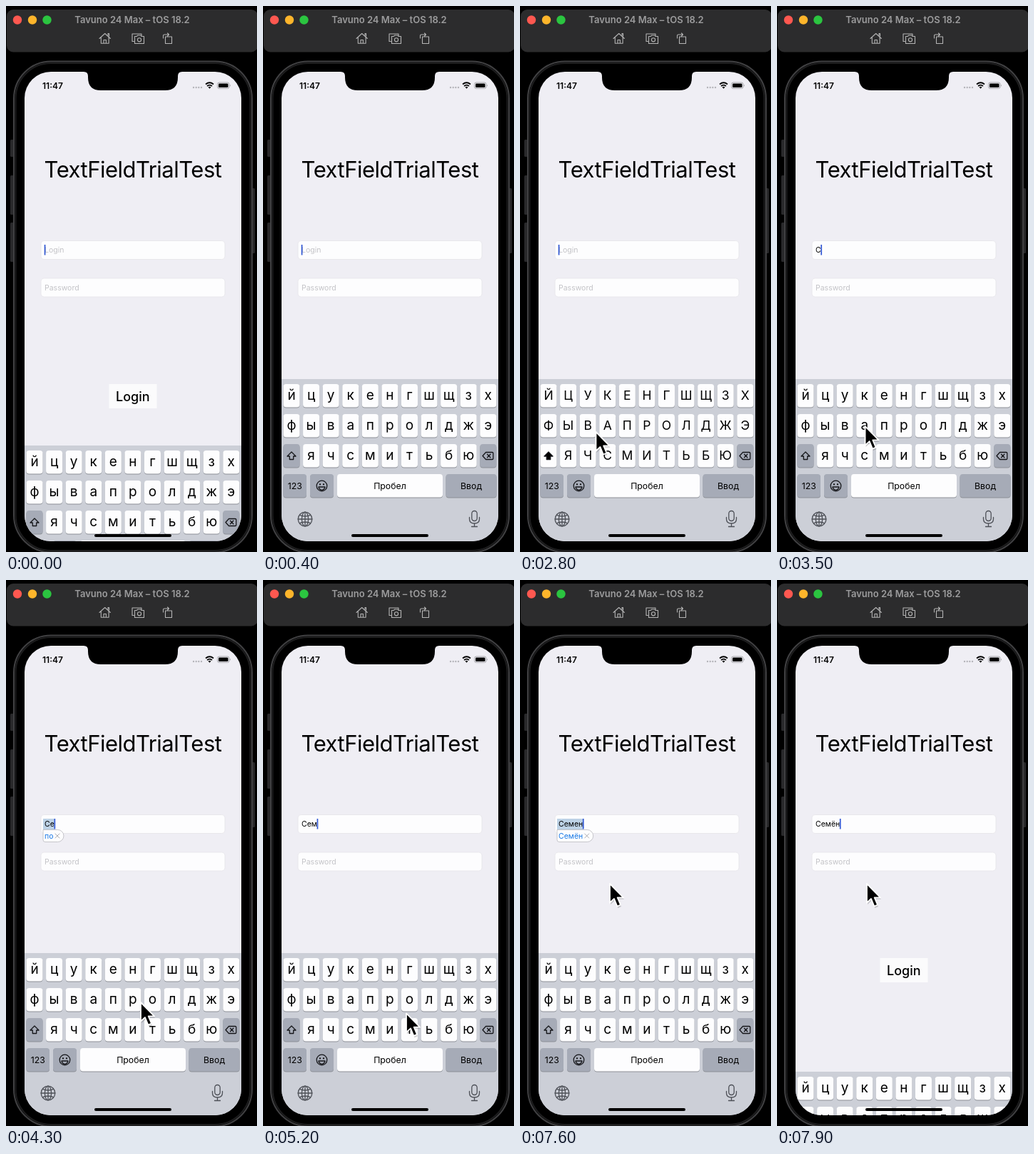
Write an HTML page that moves like this. It is 352 px wide and 764 px high and loops after 8000 ms.

```html
<!DOCTYPE html>
<html lang="en">
<head>
<meta charset="utf-8">
<title>Login form</title>
<style>
  html, body { margin: 0; width: 100%; height: 100%; overflow: hidden; background: #000; }
  svg { display: block; width: 100vw; height: 100vh; }
  text { font-family: Inter, "Open Sans", sans-serif; }
  .mid { text-anchor: middle; }
  .line { fill: none; stroke: #b4b4b4; stroke-width: 1.1; stroke-linecap: round; stroke-linejoin: round; }
  .glyph { fill: none; stroke: #15161a; stroke-width: 1.3; stroke-linecap: round; stroke-linejoin: round; }
  .soft { fill: none; stroke: #4d5057; stroke-width: 1.3; stroke-linecap: round; }
  .field { fill: #fdfdfe; stroke: #e5e4e9; stroke-width: .8; }
  .small { font-size: 10.5px; }
  .hint { fill: #c3c3c7; }
</style>
</head>
<body>
<svg viewBox="0 0 352 764">
  <defs>
    <clipPath id="screen"><rect x="26" y="92" width="304" height="657" rx="37"/></clipPath>
  </defs>
  <rect width="352" height="764" fill="#000"/>

  <!-- window bar -->
  <rect x="1" y="5" width="352" height="59.5" rx="9" fill="#2c2c2d"/>
  <circle cx="16" cy="19.5" r="6.2" fill="#fe5850"/>
  <circle cx="37" cy="19.5" r="6.2" fill="#fdb52b"/>
  <circle cx="57.5" cy="19.5" r="6.2" fill="#2bc540"/>
  <text class="mid" x="177" y="24" font-size="13" font-weight="600" fill="#9c9c9d">Tavuno 24 Max – tOS 18.2</text>
  <g class="line">
    <path d="M131 45.5l7.7-7 7.7 7M133.3 44v8.3h10.8V44M137 52v-4.500h3.400V52M143 41v-2.500h1.500v3.800"/>
    <path d="M179.500 49.500h-2.500v-10.500h13v2.500"/>
    <path d="M180.500 42.500h3l1-1.500h4.500l1 1.500h3.500v10h-13z"/>
    <circle cx="187" cy="47.300" r="2.600"/>
    <path d="M223.500 43h9v9.500h-9zM220.500 45v-3.500q0-1.500 1.500-1.500h6.500M226.500 38l2 2-2 2"/>
  </g>

  <!-- handset -->
  <g fill="#29292b">
    <rect x="6" y="187" width="5" height="24" rx="1.500"/>
    <rect x="6" y="237" width="5" height="55" rx="1.500"/>
    <rect x="6" y="303" width="5" height="55" rx="1.500"/>
    <rect x="344" y="255" width="5" height="91" rx="1.500"/>
  </g>
  <rect x="11" y="77.500" width="334" height="687" rx="52" fill="#050505" stroke="#414143" stroke-width="2"/>
  <rect x="13.500" y="80" width="329" height="682" rx="49.500" fill="#000" stroke="#1d1d1e" stroke-width="2"/>

  <g clip-path="url(#screen)">
    <rect x="26" y="92" width="304" height="657" fill="#efeef4"/>
    <path d="M109 92q6 0 6 6v2q0 18 18 18h90q18 0 18-18v-2q0-6 6-6z" fill="#000"/>
    <text x="51" y="115.500" font-size="12" font-weight="600">11:47</text>
    <g fill="#b5b5ba">
      <circle cx="263" cy="114" r="1.200"/><circle cx="266.700" cy="114" r="1.200"/>
      <circle cx="270.300" cy="114" r="1.200"/><circle cx="274" cy="114" r="1.200"/>
    </g>
    <path d="M280 109.500q5.500-4.500 11 0M282 112q3.500-2.800 7 0" fill="none" stroke="#000" stroke-width="1.700"/>
    <path d="M283.500 113.500q2-1.500 4 0l-2 2.300z"/>
    <rect x="296.500" y="107" width="16.500" height="8.500" rx="2.500" fill="none" stroke="#96969b" stroke-width=".8"/>
    <rect x="298" y="108.500" width="13.500" height="5.500" rx="1.300"/>
    <path d="M314 109.800q1.600 1.400 0 2.900z" fill="#96969b"/>

    <text class="mid" x="178" y="240" font-size="31" textLength="" letter-spacing="-.5">TextFieldTrialTest</text>
    <rect class="field" x="49" y="328.500" width="258" height="26" rx="4.500"/>
    <rect class="field" x="49" y="381" width="258" height="26" rx="4.500"/>
    <text class="small hint" x="54" y="398">Password</text>

    <rect id="mark" x="52" y="334" height="15.500" fill="#bdd2e6"/>
    <text id="hint" class="small hint" x="54" y="345.300">Login</text>
    <text id="typed" class="small" x="54" y="345.300"></text>
    <rect id="caret" y="334" width="1.700" height="14.500" fill="#3157d4"/>
    <g id="bubble">
      <path id="shape" fill="#fdfdfe" stroke="#b9b9be" stroke-width=".8"/>
      <text id="offer" class="small" x="54" y="361.800" fill="#1879e6"></text>
      <path id="close" d="M-3.300 354.700l6.600 6.600M3.300 354.700l-6.600 6.600" stroke="#a3a3a8" stroke-width=".9"/>
    </g>

    <rect x="144.500" y="529" width="67" height="34" fill="#fbfbfc"/>
    <text class="mid" x="177.800" y="552.500" font-size="18" font-weight="500">Login</text>

    <g id="board">
      <rect x="26" y="522" width="304" height="240" fill="#cccfd7"/>
      <g id="keys"></g>
      <path id="shift" d="M40 624l6 6h-3.300v4.500h-5.400V630H34z" class="glyph"/>
      <path class="glyph" d="M312.500 624.500h9q1.300 0 1.300 1.300v7.400q0 1.300-1.300 1.300h-9l-4.500-5zM314.500 627.300l4.400 4.400M318.900 627.300l-4.400 4.400"/>
      <circle class="glyph" cx="82.500" cy="671.500" r="7.300"/>
      <path class="glyph" d="M78 673h9q-1 4.300-4.500 4.300t-4.500-4.300z"/>
      <circle cx="80" cy="669.300" r="1.100"/><circle cx="85" cy="669.300" r="1.100"/>
      <g class="soft">
        <circle cx="59" cy="718" r="9.800"/>
        <ellipse cx="59" cy="718" rx="4.600" ry="9.800"/>
        <path d="M59 708.200v19.600M49.200 718h19.600M51.500 712.300q7.500 3.400 15 0M51.500 723.700q7.500-3.400 15 0"/>
        <rect x="292.800" y="706.500" width="7.400" height="14" rx="3.700"/>
        <path d="M289.500 715.500v2.500q0 6 7 6t7-6v-2.500M296.500 724v4.500M292.500 728.500h8"/>
      </g>
    </g>
    <rect x="124" y="739" width="108" height="4" rx="2"/>
  </g>

  <g id="cursor">
    <path d="M0 0V26.500L6 21 10.400 31.500 15 29.500 10.700 19.300H19z" fill="#000" opacity=".18" transform="translate(1 2.500)"/>
    <path d="M0 0V26.500L6 21 10.400 31.500 15 29.500 10.700 19.300H19z" stroke="#fff" stroke-width="1.800" stroke-linejoin="round"/>
  </g>
</svg>
<script>
const LOOP = 8000, TICK = 100;
const $ = id => document.getElementById(id);
const clamp = v => Math.max(0, Math.min(1, v));

function add(tag, attrs, label) {
  const el = document.createElementNS('http://www.w3.org/2000/svg', tag);
  for (const name in attrs) el.setAttribute(name, attrs[name]);
  if (label) el.textContent = label;
  $('keys').append(el);
  return el;
}

function addKey(x, y, w, dark) {
  const box = { x, width: w, height: 32.5, rx: 4 };
  add('rect', { ...box, y: y + 1, fill: '#8d9097' });
  return add('rect', { ...box, y, fill: dark ? '#a6abb7' : '#fdfdfe' });
}

// Letter rows share one grid of eleven columns.
const STEP = 27.58, letters = [];
['йцукенгшщзх', 'фывапролджэ', ' ячсмитьбю '].forEach((row, r) => {
  [...row].forEach((ch, c) => {
    if (ch === ' ') return;
    const y = 529 + 42 * r, x = 28.5 + STEP * c;
    addKey(x, y, 23, false);
    letters.push([add('text', { class: 'mid', x: x + 11.5, y: y + 22 }), ch]);
  });
});
const shiftKey = addKey(28.5, 613, 23, true);
addKey(304.3, 613, 23, true);
[[28.5, 32.5, 1, '123'], [66, 33, 1], [104, 148, 0, 'Пробел'], [256.5, 71, 1, 'Ввод']].forEach(([x, w, dark, label]) => {
  addKey(x, 655, w, dark);
  if (label) add('text', { class: 'mid', x: x + w / 2, y: 675.5, 'font-size': 12.3 }, label);
});

// [start, text, suggestion]
const typing = [
  [0, ''], [3300, 'С'], [4200, 'Се', 'по'], [5100, 'Сем'],
  [5900, 'Семе', 'семе'], [6600, 'Семен', 'Семён'], [7800, 'Семён']
];
const CAPS_ON = 2200, CAPS_OFF = 3300;

// [time, x, y] of the pointer tip
const route = [
  [0, 70, 800], [1500, 70, 800], [2000, 38, 627], [2300, 38, 627], [2800, 106.500, 596],
  [3050, 119, 588], [3400, 119, 588], [4000, 181, 589], [4300, 189, 591],
  [4900, 205, 611], [5100, 205, 611], [5700, 151, 548], [5900, 151, 548],
  [6100, 152, 609], [6300, 151, 612], [6700, 151, 612], [6900, 146, 545], [7200, 126, 425], [8000, 126, 425]
];

function pointer(t) {
  const i = route.findIndex(p => p[0] > t);
  const [t0, x0, y0] = route[i - 1], [t1, x1, y1] = route[i];
  const k = (t - t0) / (t1 - t0), e = k * k * (3 - 2 * k);
  return [x0 + (x1 - x0) * e, y0 + (y1 - y0) * e];
}

function boardDrop(t) {
  if (t >= 7700) return 166 * Math.pow((t - 7700) / 200, 1.2);
  return 93 * Math.pow(1 - clamp(t / 400), 2.7);
}

function caretAlpha(since) {
  const p = since % 950;
  return p < 650 ? clamp((650 - p) / 100) : clamp((p - 800) / 150);
}

function draw(t) {
  const [start, text, offer] = typing.filter(s => s[0] <= t).pop();
  $('typed').textContent = text;
  const end = 54 + (text ? $('typed').getComputedTextLength() : 0);
  $('hint').style.display = text ? 'none' : '';
  $('mark').style.display = $('bubble').style.display = offer ? '' : 'none';
  $('caret').setAttribute('x', end - .3);
  $('caret').setAttribute('opacity', caretAlpha(start ? t - start : t + 100));
  if (offer) {
    $('mark').setAttribute('width', end - 52);
    $('offer').textContent = offer;
    const x = 54 + $('offer').getComputedTextLength();
    $('shape').setAttribute('d', `M52 349.500H${x + 6}a8.500 8.500 0 0 1 0 17H55q-3 0-3-3z`);
    $('close').setAttribute('transform', `translate(${x + 5.5} 0)`);
  }

  const caps = t >= CAPS_ON && t < CAPS_OFF;
  for (const [el, ch] of letters) {
    el.textContent = caps ? ch.toUpperCase() : ch;
    el.setAttribute('font-size', caps ? 17.5 : 19);
  }
  shiftKey.setAttribute('fill', caps ? '#fdfdfe' : '#a6abb7');
  $('shift').style.fill = caps ? '#000' : 'none';

  $('board').setAttribute('transform', `translate(0 ${boardDrop(t)})`);
  $('cursor').setAttribute('transform', `translate(${pointer(t)})`);
}

const begin = performance.now();
function loop(now) {
  const t = Math.max(0, now - begin) % LOOP;
  draw(Math.floor(t / TICK) * TICK);
  requestAnimationFrame(loop);
}
draw(0);
requestAnimationFrame(loop);
</script>
</body>
</html>
```
